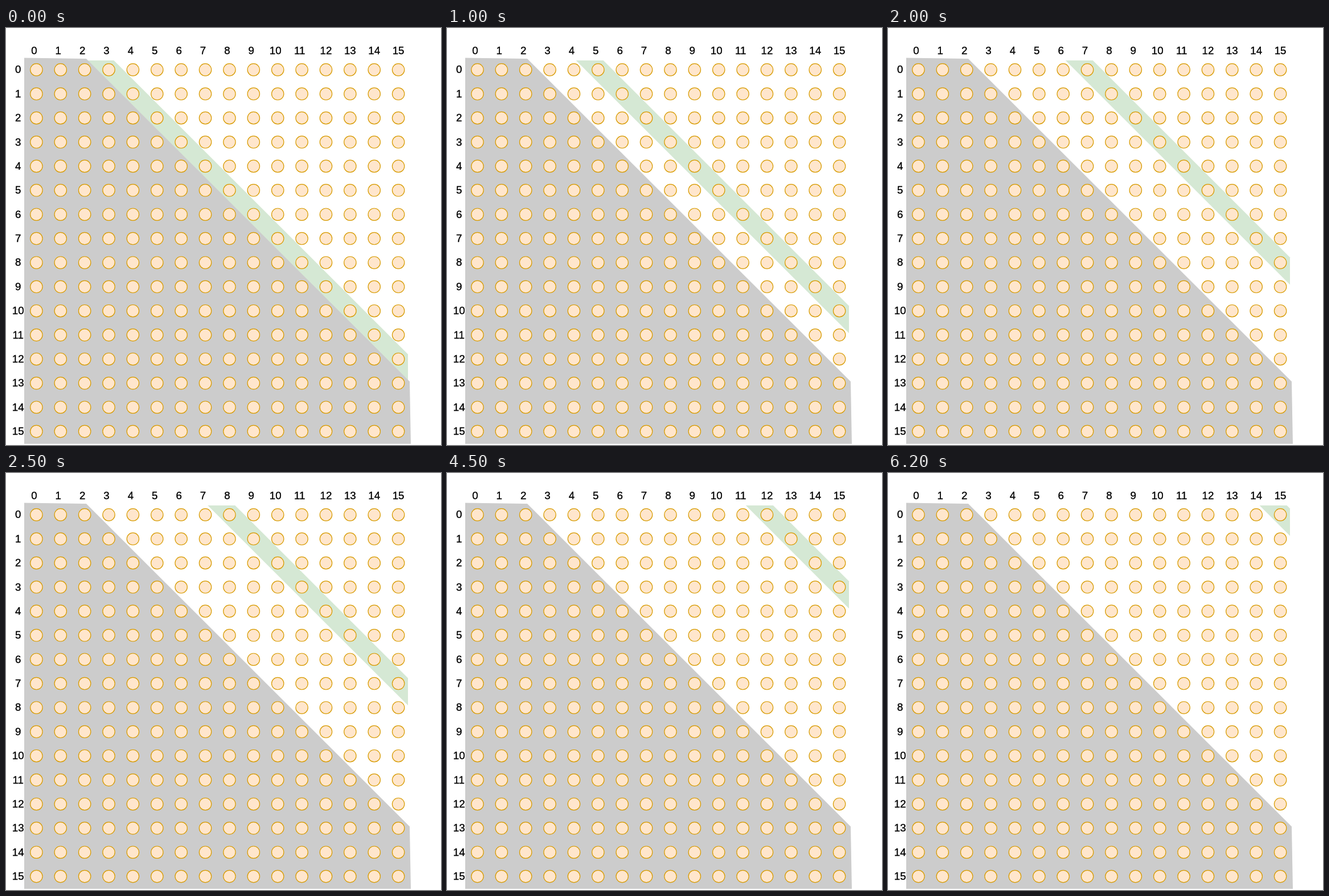
These frames come from a looping animation (764 px wide and 733 px high, 6.5 s). An HTML page:

```html
<!DOCTYPE html>
<html lang="en">
<head>
<meta charset="utf-8">
<title>Diagonal sweep</title>
<style>
  html, body { margin: 0; width: 100%; height: 100%; overflow: hidden; background: #fff; }
  svg { display: block; width: 100vw; height: 100vh; }
  text { font: 18.7px "Liberation Sans", Arial, sans-serif; text-anchor: middle; stroke: #000; stroke-width: 0.35; }
  circle { fill: #ffe6cc; stroke: #d79b00; stroke-width: 1.2; }
</style>
</head>
<body>
<svg viewBox="0 0 764 733">
  <polygon id="band" fill="#d5e8d4"/>
  <polygon fill="#ccc" points="32,52.5 141,54 709,621.5 711,731 32,731"/>
  <g id="grid"></g>
</svg>
<script>
const SIZE = 16, GAP = 42.38, LEFT = 53.4, TOP = 73.4;
const STEP = 500, FIRST = 3;
const BAND = { top: 57, right: 706, width: 48, start: 84.4, shift: 42.6 };
const band = document.getElementById('band');

// A 45 degree strip, cut off by the top and right edges
function bandPoints(step) {
  const { top, right, width, start, shift } = BAND;
  const lower = start + step * shift, upper = lower + width;
  const corner = [Math.min(right, top + upper), Math.max(top, right - upper)];
  return `${top + lower},${top} ${corner[0]},${top} ${right},${corner[1]} ${right},${right - lower}`;
}

function buildGrid() {
  let marks = '';
  for (let i = 0; i < SIZE; i++) {
    const x = LEFT + i * GAP, y = TOP + i * GAP;
    marks += `<text x="${i < 12 ? x - 4 : x}" y="46">${i}</text>`;
    marks += `<text x="21.2" y="${y + 6}">${i}</text>`;
    for (let col = 0; col < SIZE; col++)
      marks += `<circle cx="${LEFT + col * GAP}" cy="${y}" r="10.7"/>`;
  }
  document.getElementById('grid').innerHTML = marks;
}

function draw() {
  const step = Math.floor(performance.now() / STEP) % (SIZE - FIRST);
  band.setAttribute('points', bandPoints(step));
  requestAnimationFrame(draw);
}

buildGrid();
draw();
</script>
</body>
</html>
```
